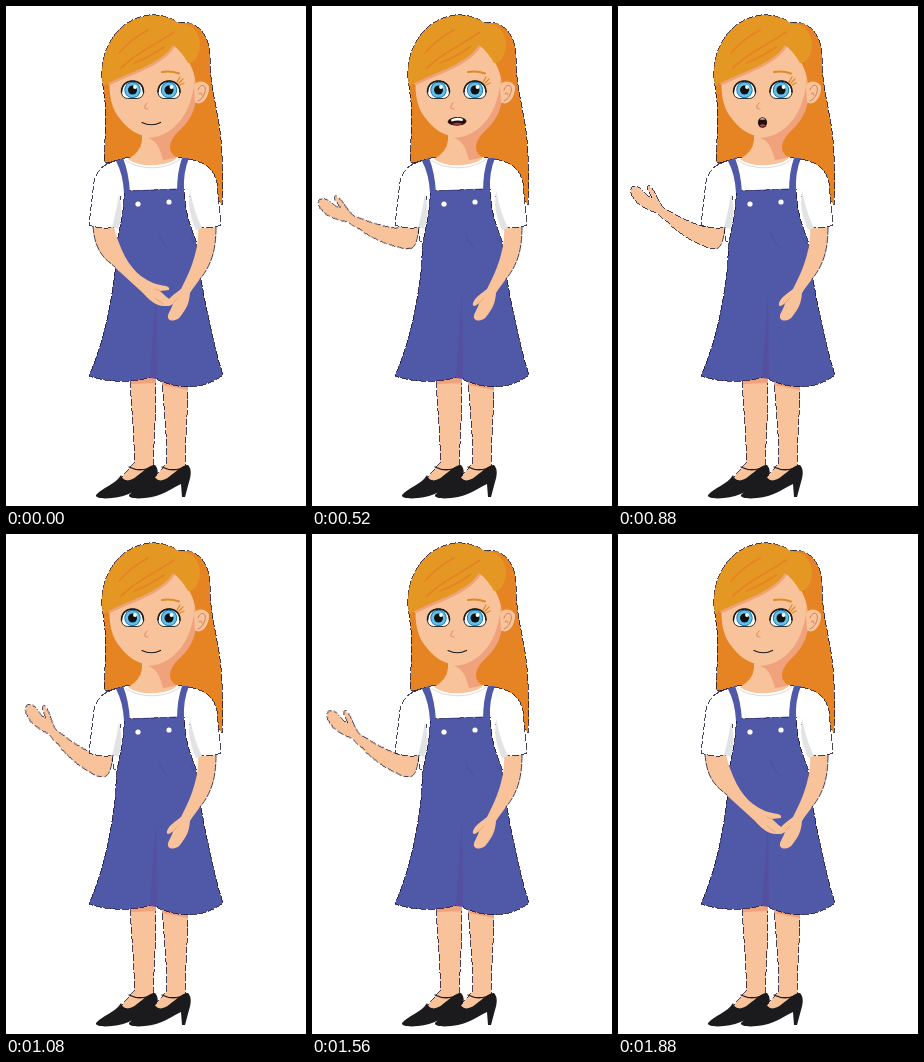
Animation, 300 px wide and 500 px high, one loop 1.92 s. Source, as an HTML page without scripts:

```html
<!DOCTYPE html>
<html lang="en">
<head>
<meta charset="utf-8">
<title>Talking girl</title>
<style>
html, body { margin: 0; width: 100%; height: 100%; overflow: hidden; background: #fff; }
svg { display: block; width: 100vw; height: 100vh; }

.edge { stroke: #1c1430; stroke-width: .8; stroke-dasharray: 7 2; shape-rendering: crispEdges; }
.line { fill: none; stroke-linecap: round; stroke-linejoin: round; }
.skin { fill: #f8c39b; }
.shade { fill: #f0a27c; }
.hair { fill: #e68323; }
.bangs { fill: #e59724; }
.strand { stroke: #e68323; stroke-width: 1.8; }
.white { fill: #fff; }
.grey { fill: #e2e3e4; }
.dress { fill: #5058a8; }
.fold { stroke: #474f9c; stroke-width: .8; }
.shoe { fill: #1b1b1e; }
.ink { stroke: #1b1b1e; }
.crease { stroke: #e99a73; stroke-width: .8; }

.rest, .raised, .lids, .smile, .wide, .round { animation: 1.92s step-end infinite; }
.rest { animation-name: rest; }
.raised { animation-name: raised; }
.lids { animation-name: blink; }
.smile { animation-name: smile; }
.wide { animation-name: wide; }
.round { animation-name: round; }
.forearm { transform-origin: 95px 232px; animation: swing 1.92s infinite; }

@keyframes rest { 0%, 97.9167% { opacity: 1 } 6.25% { opacity: 0 } }
@keyframes raised { 0%, 97.9167%, 100% { opacity: 0 } 6.25% { opacity: 1 } }
@keyframes blink { 0%, 25%, 100% { opacity: 0 } 18.75% { opacity: 1 } }
@keyframes smile { 0%, 54.1667%, 100% { opacity: 1 } 20.8333% { opacity: 0 } }
@keyframes wide { 0%, 37.5%, 100% { opacity: 0 } 20.8333% { opacity: 1 } }
@keyframes round { 0%, 54.1667%, 100% { opacity: 0 } 37.5% { opacity: 1 } }
@keyframes swing {
  0% { transform: rotate(6.4deg); animation-timing-function: step-end }
  6.25% { transform: rotate(6.4deg); animation-timing-function: steps(12) }
  31.25% { transform: rotate(-11.8deg); animation-timing-function: steps(7) }
  45.8333% { transform: rotate(0deg); animation-timing-function: steps(8) }
  62.5% { transform: rotate(12deg); animation-timing-function: steps(17) }
  97.9167%, 100% { transform: rotate(-5.6deg) }
}
</style>
</head>
<body>
<svg viewBox="0 0 300 500">
  <defs>
    <g id="eye">
      <path class="white ink" stroke-width=".9" d="M-11 3C-11-5-6-9 0-9S11-5 11 3Q10 8 5 8.500H-5Q-10 8-11 3Z"/>
      <circle r="8.200" fill="#1d6e9f"/>
      <circle r="7.300" fill="#5fc0ec"/>
      <circle r="4.500" fill="#111"/>
      <circle cx="2.500" cy="-3" r="1.900" fill="#fff"/>
      <path class="line ink" stroke-width="1.600" d="M-11 2C-11-5-6-9 0-9S11-5 11 2"/>
    </g>
    <g id="lid">
      <ellipse class="skin" rx="12.500" ry="10.500"/>
      <path class="line ink" stroke-width="1.600" d="M-11 1C-6 8 6 8 11 1"/>
    </g>
    <g id="shoe">
      <path class="shoe" d="M90 489C97 481 109 479 115 469C117 476 124 476 131 470C138 465 143 459 149 459C153 463 152 470 150 476L146 491H143L142 478C133 482 122 491 106 492C97 493 89 492 90 489Z"/>
      <path class="line ink" stroke-width="1.300" d="M123 461Q135 467 148 460"/>
    </g>
  </defs>

  <!-- hair behind -->
  <path class="hair edge" d="M96 72C94 42 112 13 143 9C155 8 166 12 172 17C190 13 204 28 204 52C204 88 215 110 216 150C217 170 217 184 216 199L200 178L180 156H98C99 130 101 105 98 88Z"/>

  <!-- legs and shoes -->
  <path class="skin edge" d="M124 366C125 405 129 430 128 457L114 473L128 477L147 462C148 435 150 405 150 366Z"/>
  <use href="#shoe"/>
  <path class="skin edge" d="M156 370C158 405 161 430 161 457L147 473L161 477L179 462C179 435 182 405 182 372Z"/>
  <path class="shade" d="M124 370H150V377L125 378ZM156 374L182 376V384L156 379Z"/>
  <use href="#shoe" x="33"/>

  <!-- neck and shirt -->
  <path class="white edge" d="M123 151C112 154 101 156 96 161L108 235H192L204 164C197 157 185 153 170 151Z"/>
  <path class="skin" d="M136 122H163V142Q165 149 171 152C161 161 133 162 122 153Q135 146 136 134Z"/>
  <path class="line grey-line" stroke="#d9dbdd" stroke-width="1" d="M119 154C134 165 161 164 174 153"/>

  <!-- dress -->
  <path class="dress edge" d="M118 185L178 183C179 207 185 222 190 235C194 278 204 318 209 341Q213 356 217 369C201 382 176 385 152 374L150 370C128 377 103 377 83 370C98 336 106 296 110 257C109 226 119 215 118 185Z"/>
  <path class="dress" d="M110 155L117 152Q123 167 124 187H118Q117 168 110 155ZM176 152H183Q177 166 178 186H171Q171 166 176 152Z"/>
  <path fill="#544f9f" d="M150 288L144 372L151 373Z"/>
  <path class="line fold" d="M124 185L171 183M153 228Q156 236 161 241M185 232Q187 237 191 239"/>
  <circle class="white" cx="132" cy="198" r="2.600"/>
  <circle class="white" cx="163" cy="196" r="2.600"/>

  <!-- arms -->
  <path class="skin" d="M192 216C194 246 183 267 175 283C169 288 163 291 161 297C160 301 163 301 167 297C166 303 161 308 162 312C164 316 171 315 174 311C180 303 183 299 184 287C190 277 203 264 207 248Q210 235 210 216Z"/>
  <path class="line edge" d="M210 221Q210 237 207 248C204 259 199 267 194 273"/>
  <path class="line crease" d="M167 297L172 292"/>
  <g class="rest">
    <path class="skin" d="M87 217C88 235 92 247 103 256L137 287C143 294 151 301 160 300C166 300 169 297 166 295Q160 291 154 285L163 284Q164 281 160 280C151 279 143 276 135 270C123 261 113 243 107 217Z"/>
    <path class="line edge" d="M87 220C88 235 92 247 103 256L109 261"/>
    <path class="line crease" d="M154 285L149 283M157 298L149 292"/>
  </g>
  <g class="raised">
    <path class="skin" d="M86 216H107C106 229 104 243 97 243Q91 242 88 232Z"/>
    <path class="line edge" d="M107 220C106 231 104 243 97 243"/>
    <path class="skin edge forearm" d="M88 221C74 218 58 209 46 202C41 197 38 187 33 181C30 178 28 181 31 186L34 192C28 190 24 183 20 181C15 179 12 181 13 187C16 197 26 203 39 207C52 220 75 240 97 243"/>
  </g>

  <!-- sleeves -->
  <path class="white edge" d="M109 155C93 160 88 168 87 184L83 219Q96 224 108 221L115 190"/>
  <path class="grey" d="M113 188Q110 207 106 221L112 223Q117 211 115 198Z"/>
  <path class="white edge" d="M183 153C198 156 208 162 211 177L215 219Q204 223 193 221L183 190"/>
  <path class="grey" d="M184 184Q188 206 196 222L190 224Q184 211 183 198Z"/>

  <!-- head -->
  <path class="skin" d="M104 69C102 90 106 104 115 114C125 127 138 132 149 131C172 126 187 110 190 94L191 66L167 34Z"/>
  <path class="shade" d="M189 68C188 100 174 125 149 131L142 132C152 135 154 144 157 154Q166 153 170 151C159 144 165 132 174 124C186 113 191 100 191 80Z"/>
  <path class="skin" d="M188 80C190 72 203 72 203 82C203 92 195 101 189 96Z"/>
  <path class="line" stroke="#c97a55" stroke-width=".9" d="M192 84C195 76 201 79 199 86Q197 93 192 95M193 88Q195 85 196 89"/>
  <path class="line" stroke="#f0a27c" stroke-width="4" d="M104 77C128 65 154 59 167 40"/>
  <path class="hair" d="M166 38C178 46 187 58 190 77Q197 73 203 80L204 52L186 17L166 20Z"/>
  <path class="bangs" d="M97 80C91 42 115 11 147 9.500C157 9.500 168 13 174 18C192 16 199 39 190 53Q187 57 182 57Q176 46 167 39C154 59 125 65 97 80Z"/>
  <path class="line strand" d="M168 26C150 39 132 45 115 62M158 41Q144 51 128 57M142 24Q125 33 113 47"/>
  <path class="line" stroke="#e08a26" stroke-width="2" d="M156 66Q165 64.500 173 67.500"/>
  <path class="line" stroke="#e08a26" stroke-width="1.300" d="M171 76L174 71M173 77L177 73M174 79L178 77"/>
  <use href="#eye" x="126.500" y="84"/>
  <use href="#eye" x="163" y="84"/>
  <g class="lids">
    <use href="#lid" x="126.500" y="84"/>
    <use href="#lid" x="163" y="84"/>
  </g>
  <path class="line" stroke="#df8e6b" stroke-width="1.100" d="M141 97Q136 103 142 103"/>

  <!-- mouth -->
  <path class="line ink smile" stroke-width="1.200" d="M136 116.500Q145.500 121 154.500 116.500"/>
  <g class="wide">
    <path fill="#26100f" d="M135.500 116C137 110 152 109 154.500 115C154 121 138 121 135.500 116Z"/>
    <path class="white" d="M139 113.500Q145 110.500 151 113L150.500 115Q145 114 139.500 115.500Z"/>
    <path fill="#a8322f" d="M140 118Q145.500 115.500 151 118Q145.500 120 140 118Z"/>
  </g>
  <g class="round">
    <ellipse fill="#26100f" cx="144.500" cy="116.500" rx="4.600" ry="5.200"/>
    <path class="white" d="M141.500 113.500Q144.500 111 147.500 113.500Z"/>
    <path fill="#b8463f" d="M141.500 119.500Q144.500 117 147.500 119.500Q144.500 122 141.500 119.500Z"/>
  </g>
</svg>
</body>
</html>
```
